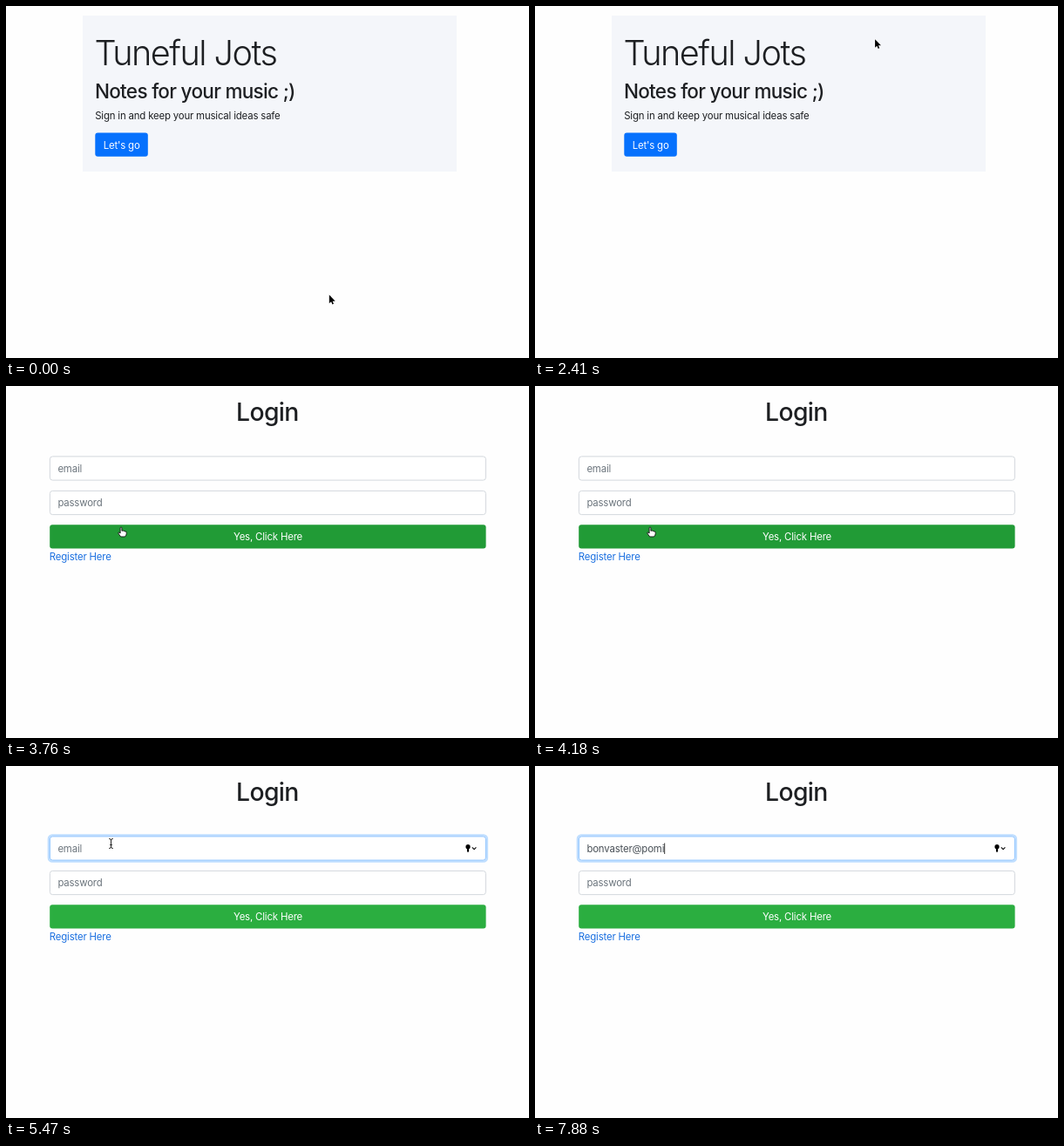
Write an HTML page that moves like this. It is 600 px wide and 404 px high and loops after 8 s.

```html
<!DOCTYPE html>
<html lang="en">
<head>
<meta charset="utf-8">
<title>Tuneful Jots</title>
<style>
  html, body { margin: 0; width: 100%; height: 100%; overflow: hidden; background: #fefefe; }
  svg { display: block; width: 100vw; height: 100vh; }
  text {
    font: 400 11.4px Inter, "Open Sans", sans-serif;
    font-optical-sizing: none;
    letter-spacing: -.17px;
    fill: #1d1f22;
    white-space: pre;
  }
  .display { font-size: 39.6px; font-weight: 300; letter-spacing: -1.5px; }
  .lead { font-size: 22.5px; font-weight: 500; letter-spacing: -.69px; }
  .head { font-size: 28.3px; font-weight: 500; letter-spacing: -.6px; }
  .mid { text-anchor: middle; }
  .light { fill: #fff; }
  .hint { fill: #6c757d; }
  .typed { fill: #495057; }
  .link { fill: #1a6fe0; }
  .field { fill: #fff; stroke: #ced4da; stroke-width: .9; }
  .outline { stroke-linejoin: round; stroke-width: 1; }
</style>
</head>
<body>
<svg viewBox="0 0 600 404">
  <g id="home">
    <rect x="88" y="11" width="429" height="179" fill="#f4f6fa"/>
    <text class="display" x="101.5" y="68">Tuneful Jots</text>
    <text class="lead" x="101.9" y="105.5">Notes for your music ;)</text>
    <text x="102.2" y="129.5">Sign in and keep your musical ideas safe</text>
    <rect id="go" x="102.3" y="145.4" width="60.5" height="27.4" rx="3"/>
    <text class="mid light" x="132.6" y="163.5">Let's go</text>
  </g>

  <g id="login">
    <text class="head" x="264" y="39.5">Login</text>
    <rect id="glow" x="48.9" y="79.4" width="503" height="30.2" rx="4.2" fill="none"
      stroke="#bfdeff" stroke-width="2.4"/>
    <rect id="email" class="field" x="50.4" y="80.9" width="500" height="27.2" rx="3"/>
    <rect class="field" x="50.4" y="120.4" width="500" height="27.2" rx="3"/>
    <text id="hint" class="hint" x="59.4" y="98.6">email</text>
    <text id="typed" class="typed" x="59.4" y="98.6"></text>
    <text class="hint" x="59.4" y="138">password</text>
    <rect id="caret" y="88.5" width=".9" height="12.5" fill="#222"/>
    <g id="key">
      <circle cx="530" cy="92.7" r="2.6"/>
      <path d="M529 94h2v4l-1 1.2-1-1.2z"/>
      <path d="M534.8 93.4l2.3 2.3 2.3-2.3" fill="none" stroke="#111" stroke-width="1.2"/>
    </g>
    <rect id="submit" x="50.2" y="159.3" width="500.4" height="27.3" rx="3"/>
    <text class="mid light" x="300.5" y="177.4">Yes, Click Here</text>
    <text class="link" x="49.8" y="200">Register Here</text>
  </g>

  <g id="pointer">
    <circle id="ring" r="12" fill="#fff" fill-opacity=".75" stroke="#111" stroke-width="1.4"/>
    <path id="arrow" class="outline" fill="#000" stroke="#fff" paint-order="stroke"
      transform="translate(.8 .6) scale(.86)"
      d="M0 0V11.2L2.6 8.9 4.2 12.6 6 11.8 4.4 8.2H8Z"/>
    <path id="hand" class="outline" fill="#fff" stroke="#111"
      transform="translate(1 .9) scale(.9)"
      d="M-1 .8Q0-.8 1 .8V4.8Q3.4 4.2 4.2 5.3 7 5 7 7.5 7 10.6 5 12.3H-.4L-3.6 7.8Q-3.6 6.2-2 7L-1 8Z"/>
    <path id="beam" fill="none" stroke="#222" stroke-width="1"
      d="M-2.3-5.5Q0-5.5 0-4 0-5.5 2.3-5.5M0-4.5V4.5M-2.3 5.5Q0 5.5 0 4 0 5.5 2.3 5.5M-1.3 1.5H1.3"/>
  </g>
</svg>

<script>
const LOOP = 8000, PAGE = 3590, FOCUS = 4600, HIDE = 5980;
const $ = id => document.getElementById(id);
const show = (id, on) => $(id).style.display = on ? '' : 'none';
const clamp = v => Math.max(0, Math.min(1, v));

// Pointer path: time, x, y
const path = [
  [0, 370, 331], [60, 365, 322], [220, 300, 200], [380, 190, 64], [460, 140, 54],
  [560, 152, 110], [700, 230, 196], [820, 290, 222], [980, 266, 224], [1180, 256, 225],
  [1480, 256, 225], [1710, 258, 240], [1900, 258, 240],
  [2060, 100, 176], [2160, 46, 84], [2280, 180, 27], [2420, 400, 40], [2560, 494, 104],
  [2700, 474, 150], [2810, 340, 120], [2930, 180, 60], [3030, 106, 110], [3120, 129.5, 164],
  [3570, 129.5, 164], [3720, 131, 161], [4290, 131, 161], [4540, 120.5, 89], [8000, 120.5, 89]
];

const keys = [
  [FOCUS, ''], [6000, 'b'], [6180, 'bo'], [6240, 'bonv'], [6410, 'bonva'], [6470, 'bonvast'],
  [6530, 'bonvaster@'], [6590, 'bonvaster@pa'], [7240, 'bonvaster@p'],
  [7420, 'bonvaster@po'], [7660, 'bonvaster@pom'], [7880, 'bonvaster@pomi']
];

const clicks = [[3360, 3560], [4590, 4830]];

// Hot areas: left, top, right, bottom, pointer shape
const homeAreas = [
  [102, 145, 163, 173, 'hand'], [102, 34, 310, 74, 'beam'],
  [102, 86, 331, 111, 'beam'], [102, 119, 314, 133, 'beam']
];
const loginAreas = [
  [50, 159, 551, 187, 'hand'], [50, 190, 122, 203, 'hand'],
  [50, 81, 551, 108, 'beam'], [50, 120, 551, 148, 'beam'], [265, 14, 335, 46, 'beam']
];

function slope(i, k) {
  const a = path[i - 1], b = path[i], c = path[i + 1];
  if (!a || !c) return 0;
  const still = (p, q) => p[1] === q[1] && p[2] === q[2];
  return still(a, b) || still(b, c) ? 0 : (c[k] - a[k]) / (c[0] - a[0]);
}

function pointerAt(t) {
  let i = 0;
  while (i < path.length - 2 && t >= path[i + 1][0]) i++;
  const a = path[i], b = path[i + 1], d = b[0] - a[0];
  const u = (t - a[0]) / d, v = 1 - u;
  return [1, 2].map(k =>
    v * v * (1 + 2 * u) * a[k] + u * v * v * d * slope(i, k) +
    u * u * (3 - 2 * u) * b[k] - u * u * v * d * slope(i + 1, k));
}

function drawPointer(t) {
  const [x, y] = pointerAt(t);
  const areas = t < PAGE ? homeAreas : loginAreas;
  const area = areas.find(r => x >= r[0] && x <= r[2] && y >= r[1] && y <= r[3]);
  const shape = area ? area[4] : 'arrow';
  $('pointer').setAttribute('transform', `translate(${x.toFixed(2)} ${y.toFixed(2)})`);
  show('pointer', t < HIDE);
  for (const id of ['arrow', 'hand', 'beam']) show(id, id === shape);
  show('ring', clicks.some(([from, to]) => t >= from && t < to));
  $('go').setAttribute('fill', area === homeAreas[0] ? '#0a60d2' : '#0671fd');
  $('submit').setAttribute('fill', area === loginAreas[0] ? '#219b36' : '#2bae40');
}

function drawInput(t) {
  const key = keys.filter(k => k[0] <= t).pop();
  const focused = !!key;
  const typed = $('typed');
  typed.textContent = focused ? key[1] : '';
  show('hint', !typed.textContent);
  show('key', focused);
  show('caret', focused && (t - key[0]) % 1060 < 530);
  const width = typed.textContent ? typed.getComputedTextLength() : 0;
  $('caret').setAttribute('x', 59.4 + width);
  const glow = clamp((t - FOCUS - 60) / 150);
  $('glow').style.opacity = glow;
  $('email').style.stroke = glow > .5 ? '#80bdff' : '';
}

function draw(t) {
  show('home', t < PAGE);
  show('login', t >= PAGE);
  drawPointer(t);
  if (t >= PAGE) drawInput(t);
}

const start = performance.now();
function tick() {
  draw((performance.now() - start) % LOOP);
  requestAnimationFrame(tick);
}
tick();
</script>
</body>
</html>
```
